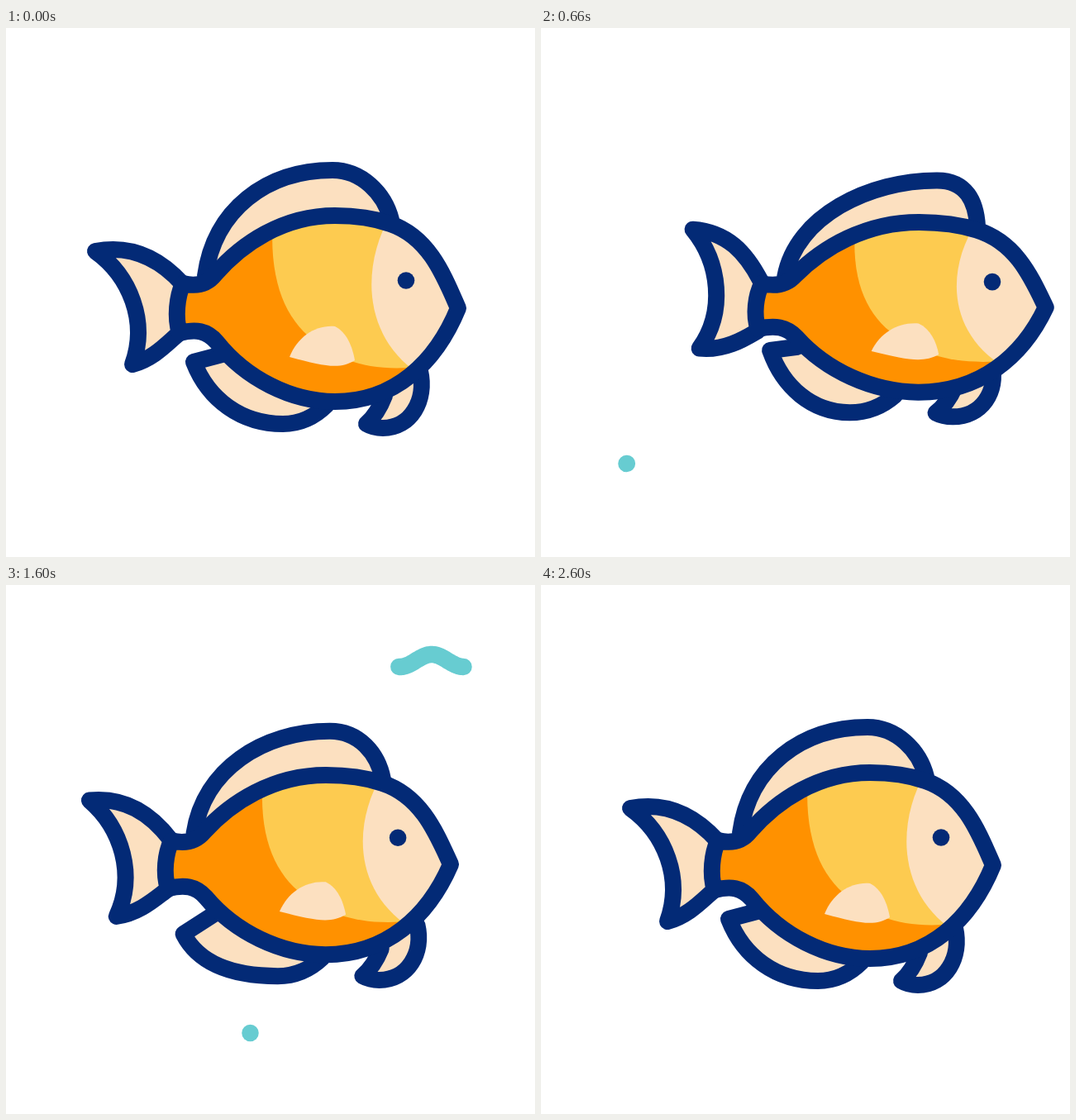
Write an HTML page with a canvas that moves like this. It is 640x640 px and loops after 2.7 s.

```html
<!DOCTYPE html>
<html lang="en">
<head>
<meta charset="utf-8">
<title>Swimming fish</title>
<style>
  html, body { margin: 0; width: 100%; height: 100%; overflow: hidden; background: #fff; }
  canvas { display: block; width: 640px; height: 640px; }
</style>
</head>
<body>
<canvas id="stage" width="640" height="640"></canvas>
<script>
const ctx = document.getElementById('stage').getContext('2d');
const LOOP = 2700;
const NAVY = '#032a76', ORANGE = '#ff9100', YELLOW = '#fdcb50', CREAM = '#fce0c0', TEAL = '#67ccd1';

// The fish at rest
const BODY = 'M547,339 C530,300 512,253 465,237 C445,230 420,227 398,227 C335,227 285,261 253,298 ' +
  'C245,308 233,314 214,309 C207,325 204,350 210,369 C230,364 243,366 255,380 ' +
  'C290,424 345,452 398,452 C470,452 520,405 547,339 Z';
const BAND = 'M323,230 C318,300 335,345 365,372 C400,403 440,416 500,410 L500,230 Z';
const HEAD = 'M469,220 C431,280 427,370 500,419 L600,419 L600,220 Z';
const PATCH = 'M343,398 C353,373 375,359 398,361 C412,368 419,385 422,402 C404,413 387,410 343,398 Z';
const TAIL = 'M213,309 C185,278 150,262 108,270 C150,300 172,355 153,407 C180,400 198,378 210,369';
const DORSAL = 'M241,300 C252,220 315,172 395,172 C430,172 458,200 466,232';
const BELLY = 'M265,394 L227,404 C245,450 285,479 335,479 C358,479 375,469 388,456';
const SMALL = 'M501,415 C509,450 490,484 456,484 C449,484 441,482 436,479 C446,470 453,458 458,445';

// neck and nose place the body axis, girth scales across it, tail is an angle in degrees,
// lean moves the top fin forward, drop lowers the belly fin tip, tuck moves the lower fins back
const pose = (neckX, neckY, noseX, noseY, girth, tail, lean, drop, tuck) =>
  ({ neckX, neckY, noseX, noseY, girth, tail, lean, drop, tuck });

const rest = pose(208, 345, 547, 339, 1, 0, 0, 0, 0);
const pulled = pose(140, 380, 434, 342, 1, -13.5, -.036, -18, 0);
const darted = pose(261, 342, 611, 338, .914, 15, .07, -9, .05);
const back = pose(198, 344, 545, 338, .948, 6.5, .043, 0, -.008);
const drift = pose(194, 344, 538, 338, .965, 5, .023, 30, -.018);
const calm = pose(200, 345, 542, 339, .98, 9, .012, 0, -.014);

const blend = (a, b, fn) => Object.fromEntries(Object.keys(a).map(k => [k, fn(a[k], b[k], k)]));
const mix = (a, b, s) => blend(a, b, (x, y) => x + (y - x) * s);
const shift = (p, dx) => ({ ...p, neckX: p.neckX + dx, noseX: p.noseX + dx });
const flick = p => ({ ...p, tail: -13 });

const KEYS = [
  [0, rest], [120, rest],
  [360, pulled], [410, mix(rest, pulled, 1.1)],
  [630, shift(darted, 6)], [660, darted],
  [930, flick(shift(back, -4))], [1180, back], [1290, shift(back, 12)],
  [1430, flick(drift)], [1600, drift], [1880, calm],
  [2060, flick(shift(calm, -4))], [2280, mix(calm, rest, .6)],
  [2600, rest], [LOOP, rest]
];

// Monotone cubic interpolation between the keys
function poseAt(t) {
  let n = 0;
  while (n < KEYS.length - 2 && t >= KEYS[n + 1][0]) n++;
  const slope = (j, k) => j < 0 || j > KEYS.length - 2 ? 0 :
    (KEYS[j + 1][1][k] - KEYS[j][1][k]) / (KEYS[j + 1][0] - KEYS[j][0]);
  const tangent = (j, k) => {
    const a = slope(j - 1, k), b = slope(j, k);
    return a * b > 0 ? 2 * a * b / (a + b) : 0;
  };
  const [t0, p] = KEYS[n], [t1, q] = KEYS[n + 1];
  const h = t1 - t0, s = (t - t0) / h, r = 1 - s;
  return blend(p, q, (a, b, k) =>
    a * (1 + 2 * s) * r * r + b * s * s * (3 - 2 * s) +
    h * s * r * (tangent(n, k) * r - tangent(n + 1, k) * s));
}

const clamp = v => Math.min(1, Math.max(0, v));
const ramp = (t, a, b) => clamp((t - a) / (b - a));

// Moves every point of a path
const warp = (d, move) => new Path2D(
  d.replace(/([\d.]+),([\d.]+)/g, (_, x, y) => move(+x, +y).map(v => v.toFixed(2)).join()));

// Position along the resting axis (0 neck, 1 nose) and height above it
function local(x, y) {
  const ax = rest.noseX - rest.neckX, ay = rest.noseY - rest.neckY, len = Math.hypot(ax, ay);
  const dx = x - rest.neckX, dy = y - rest.neckY;
  return [(dx * ax + dy * ay) / len ** 2, (dx * ay - dy * ax) / len];
}

// Carries a resting point to the pose; adjust may change [along, height] first
const carry = (p, adjust = (u, h) => [u, h]) => (x, y) => {
  const [u, h] = adjust(...local(x, y));
  const ax = p.noseX - p.neckX, ay = p.noseY - p.neckY, up = h * p.girth / Math.hypot(ax, ay);
  return [p.neckX + u * ax + up * ay, p.neckY + u * ay - up * ax];
};

// Turns about the neck, fully at the tips and not at the root
const swing = p => (x, y) => {
  const dx = x - rest.neckX, dy = y - rest.neckY;
  const a = p.tail * clamp(-dx / 40) * Math.PI / 180, c = Math.cos(a), s = Math.sin(a);
  return [p.neckX + dx * c - dy * s, p.neckY + dx * s + dy * c];
};

function drawFish(p) {
  const onBody = carry(p);
  const onTop = carry(p, (u, h) => [u + p.lean * clamp((h - 110) / 60) ** 2, h]);
  const below = carry(p, (u, h) => [u - p.tuck * clamp(u * 3), h - p.drop * clamp(1 - u * 5)]);

  ctx.strokeStyle = NAVY;
  ctx.lineWidth = 20;
  ctx.fillStyle = CREAM;
  for (const [shape, move] of [[TAIL, swing(p)], [BELLY, below], [SMALL, below], [DORSAL, onTop]]) {
    const fin = warp(shape, move);
    ctx.fill(fin);
    ctx.stroke(fin);
  }

  const body = warp(BODY, onBody);
  ctx.save();
  ctx.clip(body);
  for (const [shape, color] of [[BODY, ORANGE], [BAND, YELLOW], [HEAD, CREAM], [PATCH, CREAM]]) {
    ctx.fillStyle = color;
    ctx.fill(warp(shape, onBody));
  }
  ctx.restore();
  ctx.stroke(body);

  ctx.fillStyle = NAVY;
  ctx.beginPath();
  ctx.arc(...onBody(484, 305.5), 10.3, 0, 7);
  ctx.fill();
}

const WAVES = [
  { x: 103.5, y: 534.5, from: 645, grow: [660, 1140], trim: [1025, 1600], fade: [1610, 1640] },
  { x: 361.5, y: 91.5, from: 1120, grow: [1130, 1590], trim: [1180, 1890], fade: [1860, 1900] }
];

function drawWave(w, t) {
  if (t < w.from || t >= w.fade[1]) return;
  const span = 192, period = 76.8;
  const a = span * ramp(t, ...w.trim), b = Math.max(a + .01, span * ramp(t, ...w.grow));
  const level = d => w.y - 7.5 * Math.cos(2 * Math.PI * d / period);
  ctx.globalAlpha = 1 - ramp(t, ...w.fade);
  ctx.strokeStyle = TEAL;
  ctx.lineWidth = 20.5;
  ctx.beginPath();
  ctx.moveTo(w.x + a, level(a));
  for (let d = a + 2; d < b; d += 2) ctx.lineTo(w.x + d, level(d));
  ctx.lineTo(w.x + b, level(b));
  ctx.stroke();
  ctx.globalAlpha = 1;
}

ctx.lineCap = ctx.lineJoin = 'round';
const start = performance.now();
function frame() {
  const t = (performance.now() - start) % LOOP;
  ctx.fillStyle = '#fff';
  ctx.fillRect(0, 0, 640, 640);
  for (const w of WAVES) drawWave(w, t);
  drawFish(poseAt(t));
  requestAnimationFrame(frame);
}
frame();
</script>
</body>
</html>
```
